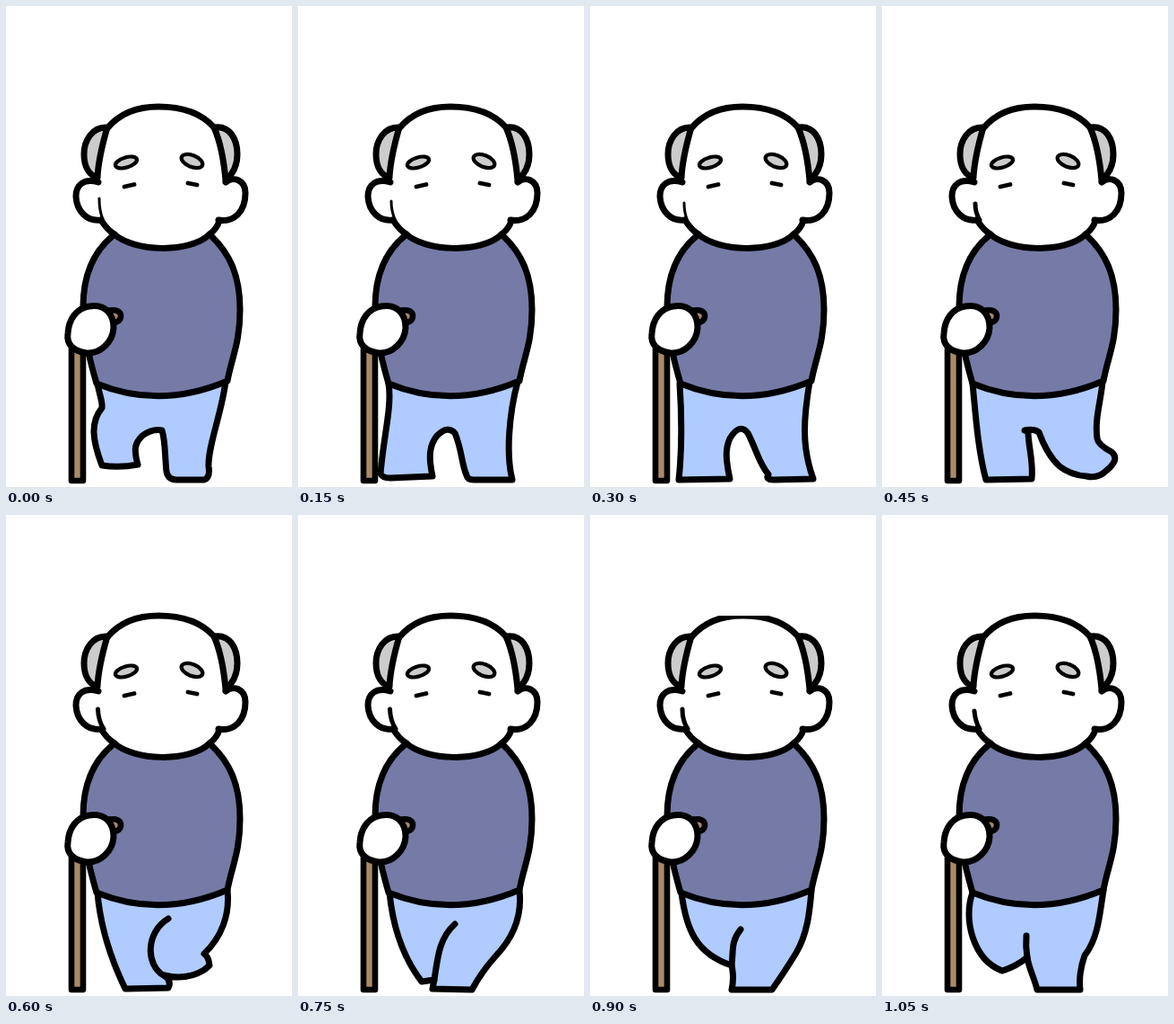
Animation of 319x535 px, one loop 1.2 s. Source, as an HTML page:

```html
<!DOCTYPE html>
<html lang="en">
<head>
<meta charset="utf-8">
<title>Walking with a cane</title>
<style>
  html, body { margin: 0; width: 100%; height: 100%; overflow: hidden; background: #fff; }
  svg { display: block; width: 100%; height: 100%; }
  path, ellipse { stroke: #000; stroke-width: 7; stroke-linecap: round; stroke-linejoin: round; fill: none; }
  .hair { fill: #ccc; }
  .brow { fill: #ccc; stroke-width: 4.2; }
  .eye { stroke-width: 4.8; }
  .skin { fill: #fff; }
  .shirt { fill: #767aa6; }
  .cane { fill: #a98a69; stroke-width: 6.6; }
  .trousers { fill: #b0cbff; }
  .cheek { stroke-width: 5; }
  .faint { stroke-width: 3; }
  .pose {
    visibility: hidden;
    animation: show 1200ms step-end infinite;
    animation-delay: calc(var(--i) * 150ms - 1200ms);
  }
  @keyframes show {
    0% { visibility: visible; }
    12.5%, 100% { visibility: hidden; }
  }
</style>
</head>
<body>
<svg viewBox="0 0 319 535">
  <g id="head">
    <path class="hair" d="M113 135C96 134 87 150 87 165C87 179 93 188 102 191C103 170 108 152 113 135Z"/>
    <path class="hair" d="M232 135C250 132 258 149 258 165C258 178 253 187 245 194C243 172 240 153 232 135Z"/>
    <path d="M113 136C127 119 148 112 170 112S216 117 232 135"/>
    <path d="M103 196C87 191 78 199 78 212C79 229 91 240 106 238"/>
    <path d="M245 196C253 189 267 193 267 208C267 228 255 241 237 238"/>
    <path d="M106 238Q112 248 121 254M227 254Q235 248 238 239"/>
    <ellipse class="brow" cx="134" cy="174" rx="12.5" ry="5.6" transform="rotate(-17 134 174)"/>
    <ellipse class="brow" cx="207.5" cy="172.5" rx="12.5" ry="6.4" transform="rotate(22 207.5 172.5)"/>
    <path class="eye" d="M132 201L143 198.5M203 197L213 199"/>
  </g>

  <g class="pose" style="--i:0">
    <path class="trousers" d="M102 420C104 432 108 440 107 447C94 463 96 482 107 511Q127 514 147 510C142 492 144 486 152 478Q163 470 174 472C178 485 177 500 179 518Q181 527 190 527L221 527Q228 525 226 512C225 490 240 455 245 418Z"/>
    <path class="faint" d="M104 214Q104 228 108 237"/>
  </g>
  <g class="pose" style="--i:1">
    <path class="trousers" d="M101 420C105 445 96 475 92 520Q94 525 103 525L150 523C145 500 147 488 155 478Q167 466 175 475C183 494 182 508 188 522Q189 527 196 527L239 527C232 500 235 455 245 418Z"/>
    <path class="faint" d="M104 217Q104 228 108 237"/>
  </g>
  <g class="pose" style="--i:2">
    <path class="trousers" d="M100 420C102 450 103 490 99 527L156 526C151 503 151 492 156 481Q167 463 176 475C186 494 188 508 199 521Q195 527 205 527L249 526C236 490 238 460 245 418Z"/>
    <path class="faint" d="M105 219Q105 229 108 237"/>
  </g>
  <g class="pose" style="--i:3">
    <path class="trousers" d="M101 420C104 450 107 495 116 527L167 526C169 505 163 490 163 473L159 472Q169 470 175 474C180 488 187 502 198 512Q211 522 228 523Q241 526 250 517Q266 504 256 496Q241 488 240 481C237 460 244 440 246 418Z"/>
    <path class="cheek" d="M104 220Q104 230 109 238"/>
  </g>
  <g class="pose" style="--i:4">
    <path class="trousers" d="M102 420C105 455 115 490 133 527L181 526Q185 519 177 512Q201 518 221 506L227 501Q226 491 221 488C240 470 250 445 247 418Z"/>
    <path d="M177 513C154 500 157 463 181 449"/>
    <path class="cheek" d="M102.5 216Q103 229 109 238"/>
  </g>
  <g class="pose" style="--i:5">
    <path class="trousers" d="M102 420C106 460 117 492 138 519L152 517L150 527L194 528C201 515 210 502 221 490C240 470 250 445 247 418Z"/>
    <path d="M152 517C156 490 158 470 175 455"/>
    <path class="cheek" d="M102.5 216Q103 229 109 238"/>
  </g>
  <g class="pose" style="--i:6">
    <path class="trousers" d="M102 420C107 460 118 488 158 501Q161 515 158 528L203 528C210 518 222 500 230 487C243 465 245 440 247 418Z"/>
    <path d="M158 501C160 485 157 474 168 461"/>
    <path class="cheek" d="M103 216Q103 229 109 238"/>
    <rect width="319" height="112" fill="#fff"/>
  </g>
  <g class="pose" style="--i:7">
    <path class="trousers" d="M101 420C90 450 102 495 134 507Q150 502 162 492C164 505 170 515 173 528L221 528Q219 510 226 490C242 470 243 440 247 418Z"/>
    <path d="M161 468Q160 480 162 492"/>
    <path class="cheek" d="M103 218Q104 230 109 238"/>
  </g>

  <g id="body">
    <path class="shirt" d="M121 254C98 272 86 300 86 335C86 365 93 393 101 420Q172 449 247 417C252 390 261 375 261 338C261 300 250 275 227 254C204 276 142 273 121 254Z"/>
    <path class="cane" d="M73 378L73 528L86 528L86 378Z"/>
    <path class="cane" d="M112 339Q129 336 128 346Q127 353 115 352Z"/>
    <path class="skin" d="M93 334C111 331 120 343 120 358C119 374 105 387 90 386C76 384 67 377 69 364C70 348 79 336 93 334Z"/>
  </g>
</svg>
</body>
</html>
```
